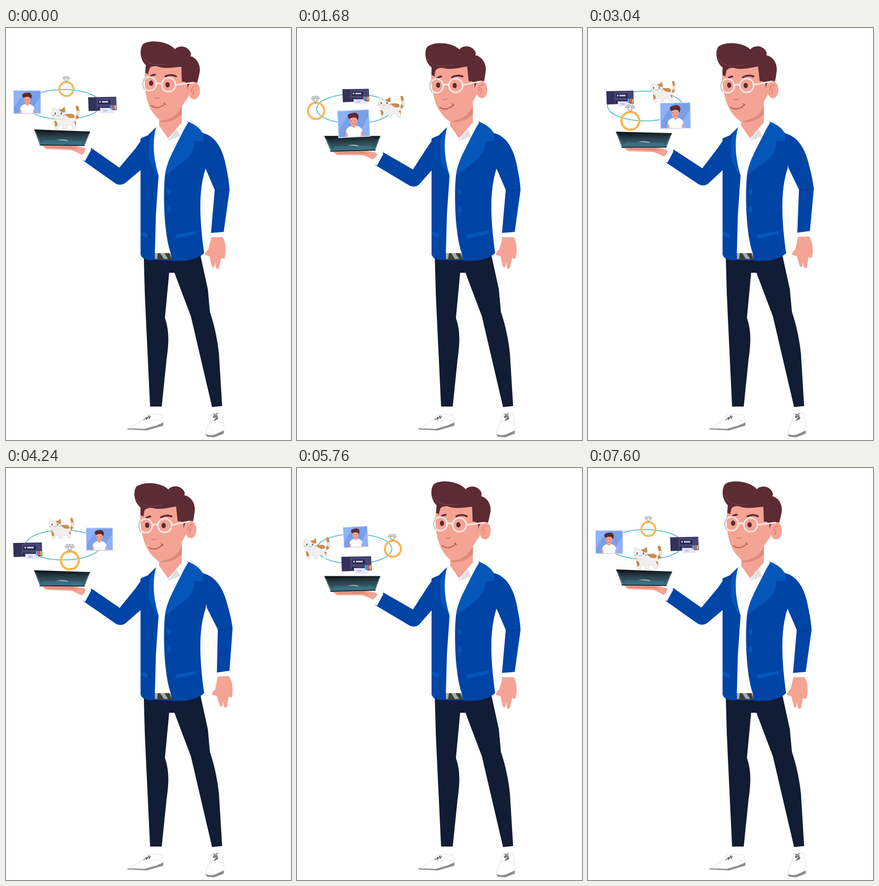
Write an HTML page that moves like this. It is 538 px wide and 776 px high and loops after 7680 ms.

```html
<!DOCTYPE html>
<html lang="en">
<head>
<meta charset="utf-8">
<title>Man with a tray</title>
<style>
  html, body { margin: 0; width: 100%; height: 100%; overflow: hidden; background: #fff; }
  svg { display: block; width: 538px; height: 776px; }
  .skin { fill: #f5a394; }
  .hair { fill: #5c2b33; }
  .blue { fill: #0044a6; }
  .lapel { fill: #0556b9; }
  .white { fill: #fff; }
  .line { fill: none; stroke-linecap: round; stroke-linejoin: round; }
  .shade { fill: #e08a78; }
</style>
</head>
<body>
<svg viewBox="0 0 538 776">
  <defs>
    <linearGradient id="glass" x2="0" y2="1">
      <stop offset="0" stop-color="#0c1012"/>
      <stop offset=".45" stop-color="#2c434d"/>
      <stop offset="1" stop-color="#3a7388"/>
    </linearGradient>
  </defs>

  <!-- legs and shoes -->
  <path fill="#111c35" d="M260 428 262 500 264 545 272 713H294L303 625C308 590 308 570 300 546L308 461H318L349 543 389 714 408 712 402 614C399 582 391 552 385 535L381 492 367 428Z"/>
  <g class="line" stroke="#e2e2e2">
    <path d="M230 754C246 745 258 741 261 731L270 727 295 729 297 744M270 741Q279 735 294 740"/>
    <path d="M388 727 408 725 411 745V764M388 727 385 742C380 750 377 757 377 765M384 742Q397 738 410 744"/>
  </g>
  <path fill="#8d8d8d" d="M228 756 231 754 262 755 283 749 297 743V749L266 758ZM376 765Q390 769 398 764L411 758V764L393 771 380 770Z"/>
  <path class="line" stroke="#555" stroke-width="1.3" d="M260 738 266 733 265 738 270 730 270 736 273 731M391 727 399 730 391 733 400 736 393 739M399 726 392 731 400 733 394 738"/>

  <!-- jacket, shirt and neck -->
  <path class="blue" d="M284 186 268 202 254 208V426C257 437 268 438 281 437L312 438C336 441 362 436 374 424 365 360 363 305 377 264L385 204 372 198 343 176 305 215Z"/>
  <path class="lapel" d="M283 188C266 206 258 240 288 279 277 244 276 216 283 188ZM342 176C362 183 375 196 374 211Q365 216 354 213C361 236 334 253 300 278 303 250 320 225 342 176ZM254 382 268 388 267 396 254 391ZM320 389 360 382V388L320 397Z"/>
  <path class="white" d="M290 170 283 188C276 215 278 245 288 278L283 350 281 424H311C299 390 296 320 300 278 303 250 320 225 343 177L335 172 305 214Z"/>
  <path class="skin" d="M291 150 288 184 305 211 332 178V130Z"/>
  <path class="shade" d="M291 174C312 174 326 162 332 146V162Q316 179 292 177Z"/>
  <path class="white" d="M289 172 283 188 304 214 307 209 289 184ZM333 172 344 178 327 205 305 214 306 208 332 178Z"/>
  <path fill="#dedede" d="M322 191 329 203 305 213Z"/>
  <path fill="#3c3f40" d="M281 424H311L313 436H281Z"/>
  <path fill="#a8aaa8" d="M281 424H287L285 435H281ZM291 424H299L306 435H298ZM308 424H311L313 435Z"/>
  <ellipse class="lapel" cx="307" cy="308" rx="3.5" ry="5.5"/>
  <ellipse class="lapel" cx="307" cy="342" rx="3.5" ry="5.5"/>

  <!-- hanging arm -->
  <g id="arm">
    <path class="skin" d="M388 394 409 394C416 404 416 424 412 435L406 433 402 452Q398 456 396 450L395 441 393 450Q389 453 388 447L384 430 375 427Q374 424 382 417Z"/>
    <path class="blue" d="M372 198C395 203 408 228 413 250 418 272 421 288 422 305L411 384 387 386 394 305 376 263Z"/>
    <path class="line" stroke="#003583" d="M395 305Q408 309 421 304"/>
  </g>

  <!-- head -->
  <g id="head">
    <path class="skin" d="M264 70C261 85 261 108 264 124 267 145 276 162 291 174 309 174 326 161 333 146L345 128V72Z"/>
    <ellipse class="skin" cx="355" cy="118" rx="11" ry="16.5"/>
    <path class="line" stroke="#d67f70" stroke-width="1.5" d="M359 109Q350 110 350 120M352 126Q356 121 354 116"/>
    <path class="hair" d="M264 70C253 60 251 40 259 30 273 21 306 25 319 40 322 35 337 31 346 42 349 46 350 49 348 53 360 56 369 70 365 86Q363 96 361 103 350 99 344 110L342 115C344 105 341 101 332 101L331 73C318 74 298 78 285 72Q275 71 271 76L268 87 263 84Z"/>
    <path class="line" stroke="#81474c" d="M257 54C267 70 285 70 304 68"/>
    <path class="line" stroke="#5c2b33" stroke-width="3.5" d="M272 92Q276 88 281 88M301 91Q311 86 321 91"/>
    <ellipse class="hair" cx="274" cy="104" rx="4" ry="5"/>
    <ellipse class="hair" cx="305" cy="107" rx="4" ry="5"/>
    <g class="line" stroke="#f6e6e2" stroke-width="3">
      <ellipse cx="271" cy="105" rx="12.5" ry="13"/>
      <circle cx="307" cy="107" r="13"/>
      <path d="M284 105Q289 102 294 106M320 107 354 103"/>
    </g>
    <path class="line" stroke="#bbb" stroke-width="1.5" d="M262 94Q255 104 261 116"/>
    <path class="line" stroke="#d97f72" stroke-width="2" d="M281 131Q285 134 289 131"/>
    <path class="line" stroke="#b4504c" stroke-width="1.6" d="M274 146Q286 155 300 143M298 141 301 144"/>
  </g>

  <!-- carrying arm, tray and orbit -->
  <path id="sleeve" class="blue"/>
  <g id="tray">
    <path class="skin" d="M67 221 128 221 148 226 153 230 143 239Q132 233 124 230L76 228Z"/>
    <path class="shade" d="M72 223H126L138 229 120 227 78 225Z"/>
    <path fill="url(#glass)" d="M53 191 159 195 148 222 64 220Z"/>
    <path fill="#3f8298" opacity=".4" d="M72 211 142 213 146 220 66 218Z"/>
    <path fill="#a9b4b8" d="M95 211Q108 208 118 212L116 213Q104 211 95 211Z"/>
    <path class="line" stroke="#5b8d9c" d="M56 196 65 218M156 200 148 220"/>
    <path class="line" stroke="#12191c" stroke-width="1.5" d="M64 220.500 148 221.500"/>
  </g>
  <path id="cuff" class="white" d="M152 225 161 229 149 251 142 245Z"/>
  <g id="orbit">
    <ellipse id="loop" class="line" cx="108" rx="71" ry="28" stroke="#43b6c2" stroke-width="1.5" stroke-dasharray="6 .8 2 .8"/>

    <g id="photo">
      <path fill="#d3dffa" d="M-27-23H27V23H-27Z"/>
      <path fill="#789fe9" d="M-25.500-21.500H25.500V21.500H-25.500Z"/>
      <path fill="#8fb1fa" d="M-25-21H-4L-25 10ZM25-10V21H5Z"/>
      <path class="skin" d="M-15 21.500-13 9-4 4V-2H4V4L12 9 15 21.500Z"/>
      <path class="white" d="M-11 21.500V16L-14 13Q-12 5-4 4L0 8 4 4Q12 5 14 13L11 16V21.500Z"/>
      <ellipse class="skin" cx="0" cy="-5" rx="6.500" ry="8.500"/>
      <path class="hair" d="M-7-8Q-13-16-4-17 8-21 9-11L7-5 5-9Q-1-12-7-8Z"/>
      <path class="line" stroke="#6a343a" stroke-width=".9" d="M-4-5V-4M2-5V-4"/>
      <path class="line" stroke="#c2605a" stroke-width=".8" d="M-3 0Q0 2 3 0"/>
    </g>

    <g id="printer">
      <path fill="#33325b" d="M-27-14 26-15 27 10-26 12Z"/>
      <path fill="#484774" d="M-11-13H26V9H-11Z"/>
      <path fill="#27274a" d="M-8-9H15V-1H-8ZM-9 4H16V9H-9Z"/>
      <path fill="#c9c9ed" d="M-6-7H-3V-4H-6ZM-1-7H11V-4H-1Z"/>
      <path fill="#e9e6fa" d="M-5 6H17L22 15.500-3 16.500Z"/>
      <path fill="#c9c4ea" d="M1 9H9V13H1Z"/>
      <path fill="#4bb5df" d="M15 1H18V9H15Z"/>
      <path fill="#ef6486" d="M19 1H22V9H19Z"/>
      <path fill="#f5bd52" d="M23 1H26V9H23Z"/>
    </g>

    <g id="cat" stroke="#d3d3d3" stroke-width=".7" fill="#f1f0ee">
      <path class="line" stroke="#c98d4f" stroke-width="5" d="M14 3Q24 1 22-10L20-18"/>
      <path class="line" stroke="#efe4d6" stroke-width="5" d="M23-4 22-9"/>
      <path d="M-19 3Q-12-6 10-6 20-3 18 9L18 20H12L11 14H2L1 21H-5L-6 15-12 14-13 21H-19Z"/>
      <path fill="#c98d4f" stroke="none" d="M-2-6H11Q17-4 15 1 5 4-2-6ZM-21 6Q-14 7-15 15L-19 17ZM14 8 18 7V15Z"/>
      <path d="M-23-18-17-14H-8L-2-19-1-8Q2 3-12 4-26 4-25-8Z"/>
      <path fill="#c98d4f" stroke="none" d="M-12-14H-8L-2-18-1-9Q-9-7-12-14Z"/>
      <path fill="#444" stroke="none" d="M-20-8H-18V-5H-20ZM-9-8H-7V-5H-9Z"/>
      <path class="line" stroke="#9b7770" d="M-16-3Q-14-1-13-3-12-1-10-3M-24-3-20-3M-5-3-1-4"/>
    </g>

    <g id="ring">
      <circle class="line" r="15" stroke="#fbb44e" stroke-width="4"/>
      <circle class="line" r="13.500" stroke="#ffd07c" stroke-width="1"/>
      <path fill="#e4e6e8" stroke="#90969a" stroke-width=".8" d="M-5-27H5L8-23 0-15-8-23ZM-8-23H8M-5-27-3-23 0-15 3-23 5-27M-3-23 0-27 3-23"/>
    </g>
  </g>
</svg>
<script>
const $ = id => document.getElementById(id);
const END = 7600, STEP = 80, LOOP = 7680, TAU = Math.PI * 2;
const LEAD = 20; // covers the delay between drawing and display
const CX = 108, RX = 71, RY = 28;
const mix = (a, b, u) => a + (b - a) * u;
const ease = (t, from, to) => {
  const u = Math.min(1, Math.max(0, (t - from) / (to - from)));
  return u * u * (3 - 2 * u);
};
const bob = t => (1 - Math.cos(TAU * t / 3800)) / 2;
const centerY = b => 144 + 8.5 * b;
const move = (id, x, y, turn, px, py) =>
  $(id).setAttribute('transform', `translate(${x} ${y}) rotate(${turn} ${px} ${py})`);

// Waypoints become angle and radius around the orbit, so items swing along it.
const times = [0, 1680, 3040, 4240, 5120, 6400, END];
function track(points) {
  let last = -Infinity;
  return [...points, points[0]].map(([x, y], i) => {
    const dx = (x - CX) / RX, dy = (centerY(bob(times[i])) - y) / RY;
    let angle = Math.atan2(dy, dx);
    if (i) while (angle < last) angle += TAU;
    last = angle;
    return { angle, radius: Math.hypot(dx, dy) };
  });
}
const items = [
  { id: 'photo', grow: .13, tilt: -3, path: track([[40, 139.5], [107, 180], [165, 165], [176.5, 134], [132.5, 128.5], [91.5, 130]]) },
  { id: 'printer', grow: .06, tilt: 0, path: track([[182, 144.5], [111, 128.5], [60.5, 132.5], [41, 155.5], [89, 179.5], [135, 177.5]]) },
  { id: 'cat', grow: .06, tilt: 0, path: track([[113, 168], [178, 148], [142, 119], [105, 113], [53, 133], [48, 164.5]]) },
  { id: 'ring', grow: .12, tilt: -3, path: track([[114, 115], [36, 156], [80, 175], [120.5, 174], [168, 167], [167, 133]]) }
];

function drawOrbit(t, b) {
  const cy = centerY(b);
  $('loop').setAttribute('cy', cy);
  const i = Math.min(times.findLastIndex(k => k <= t), times.length - 2);
  const u = (t - times[i]) / (times[i + 1] - times[i]);
  for (const item of items) {
    const p = item.path[i], q = item.path[i + 1];
    const angle = mix(p.angle, q.angle, u), radius = mix(p.radius, q.radius, u);
    const x = CX + RX * radius * Math.cos(angle);
    item.y = cy - RY * radius * Math.sin(angle);
    const size = 1 - item.grow * Math.sin(angle);
    $(item.id).setAttribute('transform', `translate(${x} ${item.y}) rotate(${item.tilt * b}) scale(${size})`);
  }
  // Lower items are nearer.
  [...items].sort((a, c) => a.y - c.y).forEach(item => $('orbit').append($(item.id)));
}

function draw(t) {
  const b = bob(t);
  const nod = ease(t, 0, 1000) - ease(t, 4800, 5900);
  const swing = ease(t, 1700, 3900) - ease(t, 3900, 5700);
  move('head', 0, 0, -4.2 * nod, 320, 208);
  move('arm', 0, 0, -4.1 * swing, 380, 215);
  move('tray', -b, 10.5 * b, -2.2 * b, 106, 207);
  move('cuff', 2 * b, 8.5 * b, 0, 0, 0);
  const elbow = (x, y) => `${x + 5 * b} ${y + 3.5 * b}`;
  const wrist = (x, y) => `${x + 2 * b} ${y + 8.5 * b}`;
  $('sleeve').setAttribute('d',
    `M270 201L254 213 245 226 ${elbow(214, 263)} ${wrist(161, 226)} ${wrist(146, 250)}` +
    ` ${elbow(207, 293)}Q${elbow(217, 298)} ${elbow(225, 292)}L256 266 270 250Z`);
  drawOrbit(t, b);
}

function tick() {
  const t = (performance.now() + LEAD) % LOOP;
  draw(Math.min(END, Math.floor(t / STEP) * STEP));
  requestAnimationFrame(tick);
}
tick();
</script>
</body>
</html>
```
